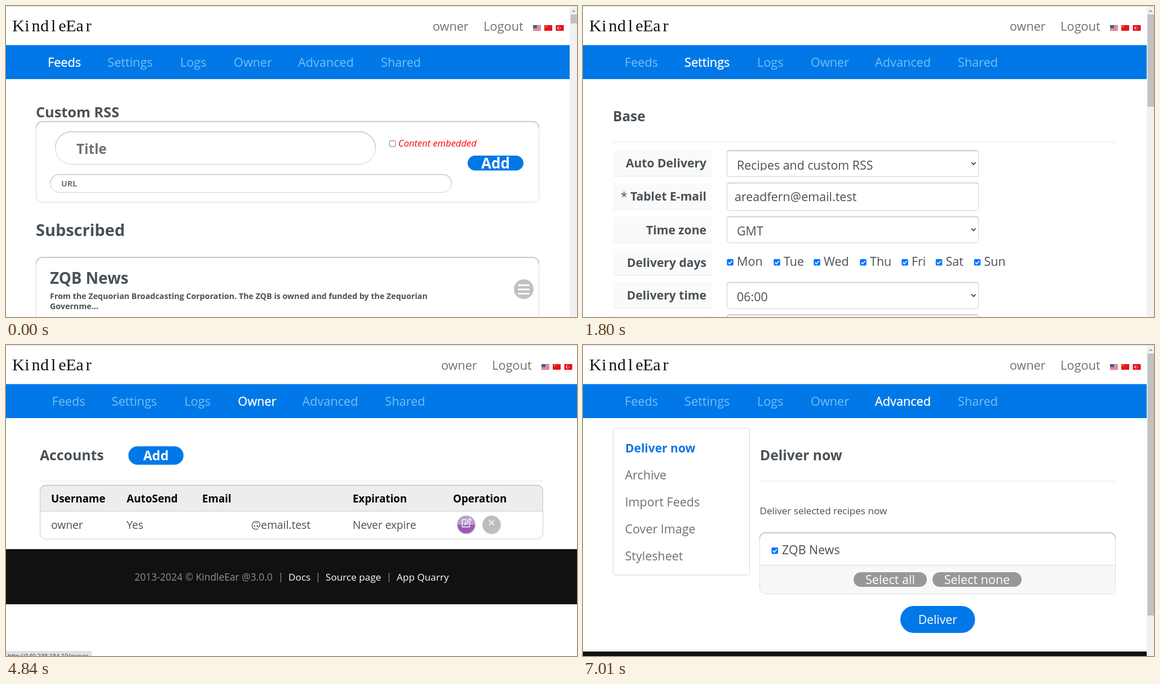
These frames come from a looping animation (1013 by 553 pixels, 8000 ms). An HTML page:

```html
<!DOCTYPE html>
<html lang="en">
<head>
<meta charset="utf-8">
<title>KindleEar</title>
<style>
  html, body { margin: 0; width: 100%; height: 100%; overflow: hidden; background: #fff; }
  svg { display: block; width: 1013px; height: 553px; font-family: "Open Sans", "Noto Sans", sans-serif; }
  text { white-space: pre; }
</style>
</head>
<body>
<svg id="stage" viewBox="0 0 1013 553"></svg>
<script>
const BLUE = '#0078e7', INK = '#495157', MUTED = '#707070', LINE = '#cbcbcb';

// Drawing helpers; each returns SVG markup.
const rect = (x, y, w, h, fill, r = 0, extra = '') =>
  `<rect x="${x}" y="${y}" width="${w}" height="${h}" rx="${r}" fill="${fill}" ${extra}/>`;

const path = (d, stroke, width = 1, extra = '') =>
  `<path d="${d}" fill="none" stroke="${stroke}" stroke-width="${width}" ${extra}/>`;

const circle = (x, y, r, fill) => `<circle cx="${x}" cy="${y}" r="${r}" fill="${fill}"/>`;

const text = (s, x, y, size, fill = INK, extra = '') =>
  `<text x="${x}" y="${y}" font-size="${size}" fill="${fill}" ${extra}>${s}</text>`;

const bold = (s, x, y, size, fill = INK, extra = '') =>
  text(s, x, y, size, fill, 'font-weight="700" ' + extra);

const MID = 'text-anchor="middle"', END = 'text-anchor="end"';

const rule = (x1, x2, y, color = '#e5e5e5') => path(`M${x1} ${y}H${x2}`, color);

// Rounded outline with a darker upper edge.
function box(x, y, w, h, r, fill = '#fff', side = '#dcdcdc', top = '#bcbcbc') {
  return rect(x, y, w, h, fill, r, `stroke="${side}"`) +
    path(`M${x} ${y + r}a${r} ${r} 0 0 1 ${r} ${-r}H${x + w - r}a${r} ${r} 0 0 1 ${r} ${r}`, top, 1.3);
}

function field(x, y, w, h, r) {
  return box(x, y, w, h, r, '#fff', '#cfcfcf', '#c8c8c8') +
    path(`M${x + r} ${y + 1.5}H${x + w - r}`, '#eee');
}

function button(label, x, y, w, h, size, base, fill = BLUE, weight = 700) {
  return rect(x, y, w, h, fill, h / 2) +
    text(label, x + w / 2, base, size, '#fff', `${MID} font-weight="${weight}"`);
}

const checked = (x, y) => rect(x, y, 11.5, 11.5, '#0075ff', 2) +
  path(`M${x + 2.4} ${y + 5.9}l2.5 2.6 4.3 -5.3`, '#fff', 1.7);

function flags(x) {
  let s = rect(x, 34, 14, 10, '#f4e6e8');
  for (let i = 0; i < 5; i++) s += rect(x, 34 + i * 2.2, 14, 1.1, '#d0354a');
  s += rect(x, 34, 7, 5.4, '#46598f');
  s += rect(x + 20, 34, 14, 10, '#e8111c') + circle(x + 23, 36.7, 1.1, '#f9d423') +
    circle(x + 25.6, 35.4, .4, '#f9d423') + circle(x + 26, 38, .4, '#f9d423');
  s += rect(x + 40.5, 34, 14, 10, '#e30a17') + circle(x + 46, 39, 2.6, '#fff') +
    circle(x + 46.8, 39, 2, '#e30a17') + circle(x + 49.3, 39, .8, '#fff');
  return s;
}

// Thin serif title set on an even, monospaced pitch.
function title(s, x, y, pitch) {
  const xs = [...s].map((_, i) => x + pitch * (i + .5)).join(' ');
  return text(s, xs, y, 30, '#111', `${MID} font-family="Liberation Serif, serif"`);
}

const TABS = [['Feeds', 74], ['Settings', 180], ['Logs', 309], ['Owner', 404], ['Advanced', 518], ['Shared', 665]];

// Page header; thumb is the lower end of the scroll thumb, 0 for no scrollbar.
function header(active, thumb) {
  const wide = !thumb, dx = wide ? 15 : 0, right = wide ? 1013 : 1000;
  let s = rect(0, 0, 1013, 553, '#fff') + rect(0, 0, 1013, 1, '#d9d9d9');
  s += title('KindleEar', 14, 44.5, 15.6);
  s += text('owner', 757 + dx, 43.5, 21.6, MUTED) + text('Logout', 847.3 + dx, 43.5, 21.7, MUTED);
  s += flags(935 + dx) + rect(0, 69.5, right, 60.5, BLUE);
  TABS.forEach(([name, x], i) => {
    const on = i === active;
    s += text(name, x + dx / 2, 108, 21.7, on ? '#fff' : '#72c0fa', on ? 'stroke="#fff" stroke-width=".4"' : '');
  });
  if (thumb) {
    s += rect(1000, 1, 13, 552, '#f1f1f1') + rect(1001.5, 15, 11.5, thumb - 15, '#c1c1c1') +
      '<path d="M1003.5 10.5l3.5 -4 3.5 4z" fill="#a3a3a3"/>';
  }
  return s;
}

function feeds() {
  let s = header(0, 31);
  s += bold('Custom RSS', 53, 198, 25.3);
  s += box(53.5, 205.5, 892, 143.5, 11);
  s += field(87.5, 223.5, 568, 58, 29) + bold('Title', 125, 262.5, 24.2, MUTED);
  s += field(78.5, 299.5, 712, 32, 16) + bold('URL', 98, 321, 14.2, MUTED);
  s += rect(680.5, 239.5, 10.5, 10.5, '#fff', 2, 'stroke="#767676"');
  s += text('Content embedded', 696, 249.5, 16.6, '#f00', 'font-style="italic"');
  s += button('Add', 819, 266, 99, 26.5, 26, 288.5);
  s += bold('Subscribed', 53, 409, 28.9);
  s += box(53.5, 447, 892, 130, 11);
  s += bold('ZQB News', 78, 494, 27.7);
  s += bold('From the Zequorian Broadcasting Corporation. The ZQB is owned and funded by the Zequorian', 78, 521, 14.25);
  s += bold('Governme...', 78, 539, 14.25);
  s += circle(918.5, 503.5, 17.5, '#c1c1c1');
  for (const y of [496.5, 504, 511.5]) s += path(`M909.5 ${y}h18`, '#fff', 3, 'stroke-linecap="round"');
  return s;
}

function settings() {
  let s = header(1, 179);
  s += bold('Base', 53, 205, 24.4) + rule(53, 946, 242);
  const labels = [['Auto Delivery', 256], ['Tablet E-mail', 315], ['Time zone', 374.5],
    ['Delivery days', 432.5], ['Delivery time', 490.5], ['', 549]];
  for (const [name, y] of labels) {
    s += rect(53, y, 175, 47, '#fafafa', 3) + rule(54, 227, y + 46.5, '#e6e6e6');
    s += bold(name, 219, y + 31, 21.1, INK, END);
  }
  s += text('*', 67, 346, 21);
  const selects = [['Recipes and custom RSS', 257], ['GMT', 374.5], ['06:00', 491.5]];
  for (const [value, y] of selects) {
    s += field(255.5, y, 446, 46.5, 4) + text(value, 273, y + 33.5, 21.4);
    s += path(`M689 ${y + 21}l3.8 4 3.8 -4`, '#333', 1.7);
  }
  s += rect(272, 293, 250, 8, '#fff');
  s += field(255.5, 314.5, 446, 49, 4) + text('areadfern@email.test', 269, 347, 21.5);
  const days = [['Mon', 273], ['Tue', 356], ['Wed', 427], ['Thu', 509], ['Fri', 583], ['Sat', 643.5], ['Sun', 711.5]];
  for (const [day, x] of days) s += checked(x - 17.7, 450) + text(day, x, 462, 21.5);
  return s + field(255.5, 549, 446, 47, 4);
}

// Table frame with a tinted head row.
function table(x, y, h, headEnd, heads, base) {
  let s = box(x, y, 892, h, 10, '#fff', LINE, '#b8b8b8');
  s += `<path d="M${x + .5} ${headEnd}V${y + 10}a9.5 9.5 0 0 1 9.5 -9.5h872a9.5 9.5 0 0 1 9.5 9.5V${headEnd}z" fill="#ededed"/>`;
  s += rule(x, x + 892, headEnd, LINE);
  for (const [name, hx] of heads) s += bold(name, hx, base, 18.8, '#000');
  return s;
}

function logs() {
  let s = header(2, 374);
  s += bold('Only display last 10 logs', 53, 198, 25.2);
  s += table(53.5, 230.5, 400, 275.5,
    [['Time', 72], ['Title', 250], ['Size', 474], ['To', 584], ['Status', 838]], 260);
  const rows = [
    ['16:23', '333.1', 'kB', 317.5, true], ['16:10', '238.8', 'kB', 388, true],
    ['15:54', '171.2', 'kB', 461, false], ['15:46', '30.9', 'MB', 538, false]];
  rows.forEach(([time, size, unit, y, ok], i) => {
    s += text('2024-03-10', 72, y - 12.5, 19.9) + text(time, 72, y + 12.5, 19.2);
    s += text('Zarnel', 250, y, 19.3);
    s += text(size, 474, y - 12.5, 19) + text(unit, 474, y + 12.5, 19);
    s += text(i ? '@boxmail.test' : 'mail.test', 800.5, y, 19.3, INK, END);
    if (ok) {
      s += button('ok', 838, y - 22.5, 49, 30.5, 19.5, y, '#008000', 400);
    } else {
      s += rect(838, y - 34.5, 88, 56.5, '#8a5a1a', 16) + rect(838, y - 35, 88, 56, '#ff8c00', 16);
      s += text('(535,', 882, y - 13, 19.2, '#fff', MID) + text("b'5.7....", 882, y + 12, 19.2, '#fff', MID);
    }
  });
  for (const y of [345.5, 415.5, 492.5]) s += rule(54, 945, y, LINE);
  // Rubbed-out parts of the addresses.
  s += rect(585, 308, 2, 1, '#999') + rect(621, 320, 2, 1.5, INK) +
    rect(705, 307, 8, 1, '#888') + rect(716, 315.5, 2, 2, INK);
  s += rect(689, 370, 28, 12.5, '#fff') + rect(666, 454, 2, 2, INK) + rect(677, 533, 12, 9, '#fff');
  return s;
}

function accounts() {
  let s = header(3, 0);
  s += bold('Accounts', 60, 205, 24.8);
  s += rect(217, 180, 98, 33, BLUE, 16.5, 'stroke="#8fbdea"') + bold('Add', 266, 205, 23, '#fff', MID);
  s += rule(60, 953, 242);
  s += table(60.5, 249.5, 95.5, 295.5,
    [['Username', 80], ['AutoSend', 214], ['Email', 348], ['Expiration', 615], ['Operation', 793]], 280);
  s += text('owner', 80, 327, 19.2) + text('Yes', 214, 327, 19.2) + text('Never expire', 615, 327, 19.1);
  s += text('@email.test', 435, 327, 19.3) + rect(439, 317, 10, 3, '#fff') + rect(438, 323, 7, 2, '#fff');
  s += circle(816.5, 320, 17, '#dcd6e0') + circle(816.5, 319.5, 15.5, '#9b59b6');
  s += '<path d="M801 319.5a15.5 15.5 0 0 1 31 0z" fill="#b9a0c6"/>';
  s += path('M817 310.5h-7.5v13h13v-7M814 319.5l1 -3.5 7.5 -7.5 2.5 2.5 -7.5 7.5z', '#fff', 1.4);
  s += circle(861.5, 320, 17, '#dedede') + circle(861.5, 319.5, 15.7, '#bdbdbd');
  s += path('M857 311.5l9 9m0 -9l-9 9', '#fff', 1.7);
  s += rect(0, 363, 1013, 98, '#111');
  s += text('2013-2024 © KindleEar @3.0.0', 228, 419, 17.4, '#8f8f8f');
  for (const x of [487.5, 553.5, 679.5]) s += path(`M${x} 405v17`, '#8f8f8f', 1.2);
  s += text('Docs', 501, 419, 17.2, '#fff') + text('Source page', 567, 419, 17.2, '#fff') +
    text('App Quarry', 693, 419, 17.2, '#fff');
  s += rect(-5, 544, 157.5, 15, '#dee1e6', 3) + text('http://140.238.184.10/owner', 3, 557, 10.7, '#3c4043');
  return s;
}

function advanced() {
  let s = header(4, 481);
  s += rect(53.5, 148, 242, 261, '#fff', 4, 'stroke="#d8d8d8"');
  s += bold('Deliver now', 75, 191, 21, '#0b74e5');
  ['Archive', 'Import Feeds', 'Cover Image', 'Stylesheet'].forEach((item, i) => {
    s += text(item, 74.5, 239 + i * 48, 21.5, MUTED);
  });
  s += bold('Deliver now', 314, 205, 24.6) + rule(314, 945, 242);
  s += text('Deliver selected recipes now', 313.5, 301, 17.1);
  s += box(313.5, 334, 631, 108.5, 10);
  s += '<path d="M314 391.5h630v41a9.5 9.5 0 0 1 -9.5 9.5h-611a9.5 9.5 0 0 1 -9.5 -9.5z" fill="#f8f8f8"/>';
  s += rule(314, 944, 391.5, '#dadada');
  s += checked(334.5, 360) + text('ZQB News', 353, 371.5, 21.4);
  s += button('Select all', 480, 404, 130, 26, 21.6, 425, '#989898', 400);
  s += button('Select none', 620, 404, 158, 26, 21.6, 425, '#989898', 400);
  s += button('Deliver', 563, 464, 132.5, 48, 21.2, 496, BLUE, 400);
  return s + rect(0, 545, 1000, 8, '#111');
}

const LOOP = 8000;
const scenes = [[feeds, 0], [settings, 500], [logs, 2670], [accounts, 4840], [advanced, 7010]];
const stage = document.getElementById('stage');
stage.innerHTML = scenes.map(([draw]) => `<g display="none">${draw()}</g>`).join('');

let shown = -1;
const start = performance.now();
function tick() {
  const t = (performance.now() - start) % LOOP;
  const now = scenes.findLastIndex(([, from]) => t >= from);
  if (now !== shown) {
    [...stage.children].forEach((g, i) => g.setAttribute('display', i === now ? 'inline' : 'none'));
    shown = now;
  }
  requestAnimationFrame(tick);
}
tick();
</script>
</body>
</html>
```
